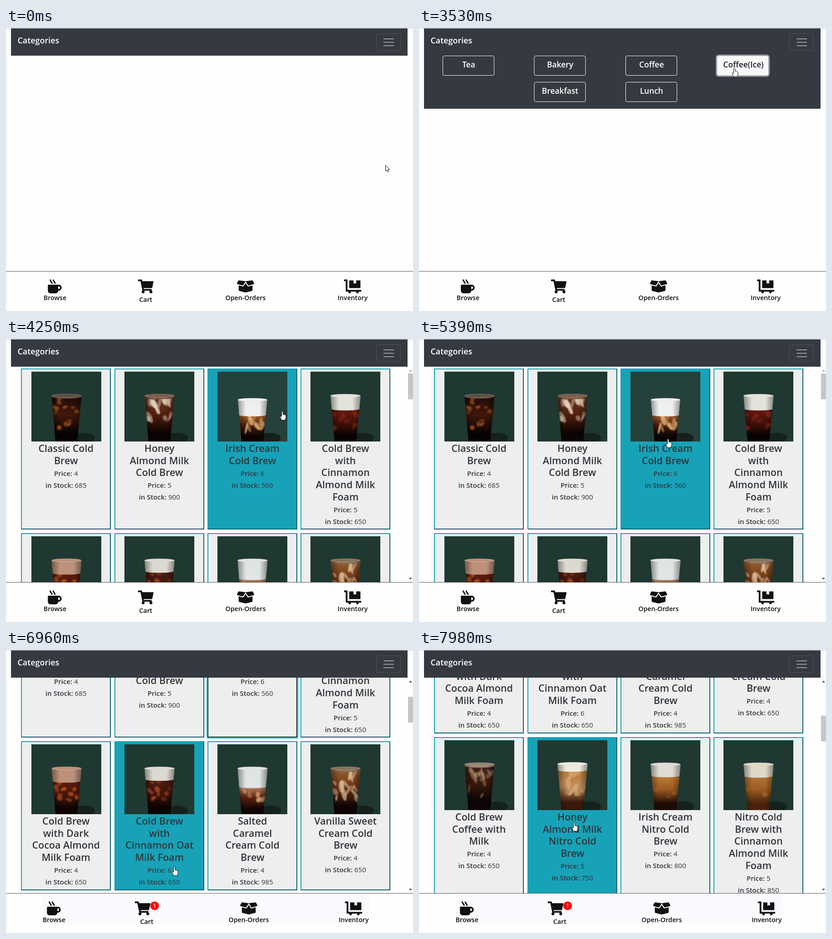
Animation, 897 px wide and 624 px high, one loop 8000 ms. Source, as an HTML page:

```html
<!DOCTYPE html>
<html lang="en">
<head>
<meta charset="utf-8">
<title>Ordering screen</title>
<style>
html, body { margin: 0; width: 100%; height: 100%; overflow: hidden; background: #fefefe; }
svg { display: block; width: 897px; height: 624px; }
text { font-family: "Open Sans", "Noto Sans", sans-serif; text-anchor: middle; }
.brand { font-size: 17.9px; font-weight: 600; fill: #fff; text-anchor: start; }
.tab { font-size: 17.4px; font-weight: 600; fill: #fff; }
.title { font-size: 21.5px; font-weight: 600; }
.info { font-size: 15px; }
.info tspan { font-weight: 600; }
.foot { font-size: 14.2px; font-weight: 600; fill: #111; }
.card text { fill: #2f353b; }
</style>
</head>
<body>
<svg id="stage" viewBox="0 0 897 624"></svg>
<script>
const LOOP = 8000, STEP = 120, NAV = 61, FLOOR = 536;
const TEAL = '#17a2b8', DARK = '#353a41', BACKDROP = '#1f3831';
const CARD_W = 198;
const ROW_H = [355, 329, 355];
const ROW_Y = [4, 367, 704];

// Each run: start time, number of steps, end value(s)
const POINTER = [
  [500, 1, 836, 295], [650, 5, 834, 64], [1280, 2, 836, 39], [2530, 6, 695, 88],
  [3830, 1, 688, 93], [3980, 2, 629, 139], [4250, 4, 549, 220], [5510, 5, 410, 426],
  [6140, 1, 384, 481], [6290, 1, 380, 489], [6540, 1, 377, 490], [6960, 1, 371, 478],
  [7110, 6, 359, 458], [7860, 2, 342, 380]
];
const NAV_RUNS = [[1920, 1, 105], [2040, 1, 157], [2160, 1, 178], [3680, 1, 98], [3830, 1, 65], [3980, 1, 61]];
const SCROLL = [[6810, 1, 105], [6960, 1, 227], [7110, 6, 573]];

const TABS = [['Tea', 0, 0], ['Bakery', 1, 0], ['Coffee', 2, 0], ['Coffee(Ice)', 3, 0], ['Breakfast', 1, 1], ['Lunch', 2, 1]];
const PICKED = 3;

// name, price, stock, drink: [top, foam depth, foam, upper, middle, lower, fleck, fleck count, streaks]
const ITEMS = [
  ['Classic Cold|Brew', 4, 685, [53, 3, '#5b4a40', '#1f0d09', '#43170a', '#080303', '#a5541f', 14, 0]],
  ['Honey|Almond Milk|Cold Brew', 5, 900, [53, 4, '#7a5a45', '#6a3a22', '#4f1c0b', '#0c0303', '#e9d5c2', 17, 1]],
  ['Irish Cream|Cold Brew', 6, 560, [62, 33, '#eef0f0', '#a8642c', '#45190a', '#090303', '#e0b070', 11, 1]],
  ['Cold Brew|with|Cinnamon|Almond Milk|Foam', 5, 650, [53, 29, '#e3e2db', '#651a0f', '#48110b', '#090303', '#8a2818', 11, 0]],
  ['Cold Brew|with Dark|Cocoa Almond|Milk Foam', 4, 650, [53, 28, '#bd917a', '#5c1d0f', '#4a170b', '#0e0404', '#b2501e', 13, 0]],
  ['Cold Brew|with|Cinnamon Oat|Milk Foam', 6, 650, [53, 24, '#dcdad0', '#4a1d10', '#40130a', '#0a0303', '#a3451c', 13, 0]],
  ['Salted|Caramel|Cream Cold|Brew', 4, 985, [53, 40, '#dfe5e4', '#bd8a68', '#5a200e', '#100505', '#cf9c6c', 10, 0]],
  ['Vanilla Sweet|Cream Cold|Brew', 4, 650, [53, 4, '#8a7058', '#95612f', '#6a2f10', '#0f0505', '#dcbf9c', 15, 1]],
  ['Cold Brew|Coffee with|Milk', 4, 650, [53, 4, '#9a8270', '#43241a', '#351809', '#0c0505', '#b08a6c', 14, 1]],
  ['Honey|Almond Milk|Nitro Cold|Brew', 5, 750, [52, 14, '#eeeae0', '#b87b36', '#c08c5a', '#3a180a', '#d8ad78', 9, 1]],
  ['Irish Cream|Nitro Cold|Brew', 4, 800, [53, 25, '#dedcd5', '#bd7d36', '#9a5820', '#1f0b06', '#a9662a', 5, 0]],
  ['Nitro Cold|Brew with|Cinnamon|Almond Milk|Foam', 5, 850, [53, 26, '#e0d8c9', '#b57433', '#995a22', '#4a220d', '#a9692c', 5, 0]]
];

const STEAM = 'M64 18C63 8 70 0 80 0H97C105 0 112 6 113 14C116 34 125 53 139 67C160 88 172 114 176 142C177 152 169 160 160 160H143C135 160 128 154 127 146C124 130 117 115 105 102C82 79 68 50 64 18Z';
// label, icon centre, text centre, baseline, icon width, path; later centres come last
const FOOTER = [
  ['Browse', 107.5, 108, 599.5, 512, `${STEAM}M400 192H32C14 192 0 206 0 224V416C0 469 43 512 96 512H288C341 512 384 469 384 416H400A112 112 0 0 0 400 192ZM400 352H384V256H400A48 48 0 0 1 400 352Z`, 105.5, 105.8],
  ['Cart', 308, 308, 604, 576, 'M528 301L575 93C579 78 567 64 552 64H159L150 19C148 8 138 0 127 0H24C11 0 0 11 0 24V40C0 53 11 64 24 64H94L164 407A56 56 0 1 0 231 416H441A56 56 0 1 0 504 406L510 381C513 366 502 352 487 352H218L212 320H505C516 320 526 312 528 301Z', 301, 310.3],
  ['Open-Orders', 528, 528, 599.5, 640, 'M426 256C409 256 393 247 384 233L320 126L256 233C245 251 223 260 201 254L64 215V393C64 408 74 420 88 424L304 478Q320 482 335 478L552 424C566 420 576 408 576 393V215L439 254ZM638 144L587 41C584 35 577 31 570 32L320 64L412 216C416 222 423 225 430 223L628 167C638 164 643 153 638 144ZM53 41L2 144C-3 153 2 164 12 167L210 223C217 225 224 222 228 216L320 64L70 32C63 31 56 35 53 41Z', 535, 535],
  ['Inventory', 764, 764, 599.5, 640, 'M208 320H592Q608 320 608 304V48Q608 32 592 32H448V160L400 128L352 160V32H208Q192 32 192 48V304Q192 320 208 320ZM624 384H128V16Q128 0 112 0H16Q0 0 0 16V48Q0 64 16 64H64V432Q64 448 80 448H163A48 48 0 1 0 253 448H451A48 48 0 1 0 541 448H624Q640 448 640 432V400Q640 384 624 384Z', 766, 766.3]
];

const rect = (x, y, w, h, fill, more = '') => `<rect x="${x}" y="${y}" width="${w}" height="${h}" fill="${fill}" ${more}/>`;
const label = (cls, x, y, s, more = '') => `<text class="${cls}" x="${x}" y="${y}" ${more}>${s}</text>`;
const tabX = c => 52.5 + 201.5 * c;
const tabY = r => 61.5 + 58 * r;
// Card edges sit on whole pixels
const column = (x, i) => Math.round(x + 205.1 * (i % 4));
const cardX = i => column(33.4, i);

function random(seed) {
  return () => (seed = seed * 16807 % 2147483647) / 2147483647;
}

function drink(i, [top, depth, foam, a, b, c, fleck, count, streaks]) {
  const rnd = random(911 + i * 7919);
  for (let k = 0; k < 5; k++) rnd();
  const surface = top + depth;
  const back = i === 2 ? '#25413b' : BACKDROP;
  let flecks = '';
  for (let k = 0; k < count; k++) {
    const x = 52 + rnd() * 50, y = surface + 3 + rnd() * (122 - surface);
    const rx = streaks ? 2 + rnd() * 4 : 3 + rnd() * 4.5;
    const ry = streaks ? 6 + rnd() * 9 : 2.5 + rnd() * 4;
    flecks += `<ellipse cx="${x}" cy="${y}" rx="${rx}" ry="${ry}" fill="${fleck}" opacity="${.4 + rnd() * .5}" transform="rotate(${rnd() * 90 - 45} ${x} ${y})"/>`;
  }
  return `<linearGradient id="mix${i}" x2="0" y2="1"><stop stop-color="${a}"/><stop offset=".4" stop-color="${b}"/><stop offset=".8" stop-color="${c}"/></linearGradient>
    ${rect(0, 0, 154, 154, back)}
    <ellipse cx="116" cy="146" rx="24" ry="11" fill="#14211d" clip-path="url(#photo)"/>
    <g clip-path="url(#glass)">
      ${rect(40, surface, 75, 155 - surface, `url(#mix${i})`)}<g filter="url(#soft)">${flecks}</g>
      ${rect(40, top, 75, depth, foam)}<ellipse cx="77" cy="${surface}" rx="33" ry="3.5" fill="${foam}"/>
      ${rect(40, top, 75, 155 - top, 'url(#sides)')}
      ${rect(40, 0, 75, top, back)}
      <ellipse cx="77" cy="${top}" rx="33" ry="3.5" fill="${foam}"/>
    </g>
    <ellipse cx="77.5" cy="${top}" rx="32.5" ry="3.5" fill="none" stroke="#d8d5cc" stroke-opacity=".4"/>`;
}

function card(i) {
  const [name, price, stock, look] = ITEMS[i];
  const row = i >> 2, h = ROW_H[row], mid = 99.2;
  const lines = name.split('|');
  const y = 184 + 26.7 * (lines.length - 1) + 26;
  return `<g class="card" transform="translate(${cardX(i)} ${ROW_Y[row]})">
    ${rect(0, 0, CARD_W, h, '#eee', `id="card${i}"`)}
    <path d="M1 ${h}V1H${CARD_W}" fill="none" stroke="${TEAL}" stroke-width="2"/>
    <path d="M1 ${h - 1}H${CARD_W - 1}V1" fill="none" stroke="#10606d" stroke-width="2"/>
    <g transform="translate(${column(55.8, i) - cardX(i)} 7)">${drink(i, look)}</g>
    ${lines.map((s, k) => label('title', mid, 184 + 26.7 * k, s)).join('')}
    ${label('info', mid, y, `<tspan>Price:</tspan> ${price}`)}
    ${label('info', mid, y + 26, `<tspan>in Stock:</tspan> ${stock}`)}
    ${i === 2 ? `<g id="cardFocus">
      ${rect(-1.5, -1.5, CARD_W + 3, h + 3, 'none', `rx="3" stroke="${TEAL}" stroke-opacity=".5" stroke-width="3"`)}
      ${rect(.75, .75, CARD_W - 1.5, h - 1.5, 'none', 'rx="2" stroke="#101418" stroke-width="1.5"')}</g>` : ''}
  </g>`;
}

function tab([name, c, r], i) {
  const x = tabX(c), y = tabY(r);
  const ring = i === PICKED ? rect(x - 1.5, y - 1.5, 116, 46, 'none', 'id="tabFocus" rx="5" stroke="#97999d" stroke-width="3"') : '';
  return rect(x, y, 113, 43, 'transparent', `id="tab${i}" rx="3.5" stroke="#f8f9fa"`) + ring +
    label('tab', x + (i === PICKED ? 58 : 57), y + 25.5, name, `id="tabText${i}"`);
}

document.getElementById('stage').innerHTML = `
  <defs>
    <clipPath id="glass"><path d="M44 48H111L101 154H53Z"/></clipPath>
    <clipPath id="photo">${rect(0, 0, 154, 154, '#000')}</clipPath>
    <clipPath id="view"><rect id="viewBox" x="0" width="886"/></clipPath>
    <clipPath id="menu"><rect id="menuBox" x="0" y="50" width="897"/></clipPath>
    <filter id="soft"><feGaussianBlur stdDeviation="1"/></filter>
    <linearGradient id="sides"><stop stop-opacity=".5"/><stop offset=".3" stop-opacity="0"/><stop offset=".7" stop-opacity="0"/><stop offset="1" stop-opacity=".5"/></linearGradient>
  </defs>
  ${rect(0, 0, 897, 624, '#fefefe')}
  <g id="shop">
    <g clip-path="url(#view)"><g id="list">${ITEMS.map((_, i) => card(i)).join('')}</g></g>
    <path id="up" d="M888 2.5L891.5 -1.5L895 2.5Z"/>
    <path d="M888 526.5H895L891.5 530.5Z" fill="#505050"/>
    <rect id="thumb" x="886" width="11" fill="#c6c6c6"/>
  </g>
  ${rect(0, 0, 897, 1, '#d5d6d8')}
  <rect id="nav" x="11" y="1" width="874" fill="${DARK}"/>
  ${label('brand', 25.5, 34, 'Categories')}
  <g clip-path="url(#menu)">${TABS.map(tab).join('')}</g>
  ${rect(816.5, 12.5, 53, 37, 'none', 'rx="3.5" stroke="#fff" stroke-opacity=".12"')}
  <g id="burgerFocus">
    ${rect(815.5, 11.5, 55, 39, 'none', 'rx="3.5" stroke="#fff" stroke-width="1.5"')}
    ${rect(817, 13, 52, 36, 'none', 'rx="2" stroke="#0c0e10" stroke-width="1.5"')}
  </g>
  <path d="M832 24H855M832 31.5H855M832 39H855" stroke="#999c9f" stroke-width="2"/>
  ${rect(0, FLOOR, 897, 88, '#fefefe')}
  ${rect(82, 540, 718, 64, '#f9fafd', 'id="tint"')}
  ${rect(0, FLOOR, 897, 1, '#555')}
  ${FOOTER.map(([name, , x, y, , d], i) => `<path id="icon${i}" d="${d}" fill="#111" fill-rule="evenodd"/>${i ? '' : `<path id="steam" d="${STEAM}" fill="#111"/>`}${label('foot', x, y, name, `id="foot${i}"`)}`).join('')}
  <g id="badge"><circle cx="327.5" cy="564" r="9.5" fill="#f00"/>${label('info', 327.5, 569.3, '1', 'fill="#fff"')}</g>
  <g id="pointer" fill="#fff" stroke="#111" stroke-linejoin="round">
    <path id="arrow" d="M.5 .5V13.5L3.5 10.8L5.5 15.5L7.5 14.6L5.5 10H9.5Z"/>
    <path id="hand" d="M-1.6 1.4Q0 -.6 1.6 1.4V7.4Q3.2 6.2 4.2 7.8Q5.8 7 6.3 8.7Q8 8.2 8 10V14Q8 16 6.5 17.5V19.6H-2V18Q-5 14 -5 11.5Q-4.5 9.8 -1.6 12Z"/>
  </g>`;

const parts = {};
document.querySelectorAll('#stage [id]').forEach(e => parts[e.id] = e);
const set = (id, attrs) => { for (const k in attrs) parts[id].setAttribute(k, attrs[k]); };
const show = (id, on) => set(id, { visibility: on ? 'visible' : 'hidden' });

function follow(runs, t, start) {
  let now = start;
  for (const [t0, n, ...end] of runs) {
    if (t < t0) break;
    const k = Math.min(n, Math.floor((t - t0) / STEP) + 1) / n;
    now = now.map((v, i) => v + (end[i] - v) * k);
  }
  return now;
}

const inside = (x, y, l, t, w, h) => x >= l && x <= l + w && y >= t && y <= t + h;

function draw(t) {
  const [x, y] = follow(POINTER, t, [836, 302]);
  const [nav] = follow(NAV_RUNS, t, [NAV]);
  const scroll = Math.round(follow(SCROLL, t, [0])[0]);
  const loaded = t >= 3680, ordered = t >= 5510, open = nav > 70;

  const tabHit = y > nav - 7 ? -1 : TABS.findIndex(([, c, r]) => inside(x, y, tabX(c), tabY(r), 113, 43));
  const cardHit = !loaded || y < nav || y > FLOOR ? -1 : ITEMS.findIndex((_, i) =>
    inside(x, y, cardX(i), nav + ROW_Y[i >> 2] - scroll, CARD_W, ROW_H[i >> 2]));
  const burgerHit = inside(x, y, 816, 12, 53, 37);

  set('nav', { height: nav - 1 });
  set('menuBox', { height: Math.max(0, nav - 57.5) });
  TABS.forEach((_, i) => {
    show('tab' + i, open);
    show('tabText' + i, open);
    set('tab' + i, { fill: i === tabHit ? '#f8f9fa' : 'transparent' });
    parts['tabText' + i].style.fill = i === tabHit ? '#212529' : '#fff';
  });
  show('tabFocus', t >= 3530 && open);
  show('burgerFocus', t >= 1800 && t < 3530);

  show('shop', loaded);
  set('viewBox', { y: nav, height: FLOOR - nav });
  set('list', { transform: `translate(0 ${nav - scroll})` });
  ITEMS.forEach((_, i) => set('card' + i, { fill: i === cardHit ? TEAL : '#eee' }));
  parts.cardFocus.style.display = ordered ? '' : 'none';

  const view = FLOOR - nav, ratio = (view - 30) / 3708;
  set('thumb', { y: nav + 15 + scroll * ratio, height: view * ratio });
  set('up', { transform: `translate(0 ${nav + 8})`, fill: scroll ? '#505050' : '#a8a8a8' });

  FOOTER.forEach(([, icon, text, , width, , icon2, text2], i) => {
    const left = (ordered ? icon2 : icon) - width * .0298;
    const place = `translate(${left} 554.5) scale(.0596)`;
    set('icon' + i, { transform: place });
    if (!i) set('steam', { transform: place + ' translate(112 0)' });
    set('foot' + i, { x: ordered ? text2 : text });
  });
  show('badge', ordered);
  show('tint', ordered);

  const hand = tabHit >= 0 || cardHit >= 0 || burgerHit;
  set('pointer', { transform: `translate(${x} ${y})` });
  show('hand', hand);
  show('arrow', !hand);
}

function tick() {
  draw(performance.now() % LOOP);
  requestAnimationFrame(tick);
}
tick();
</script>
</body>
</html>
```
